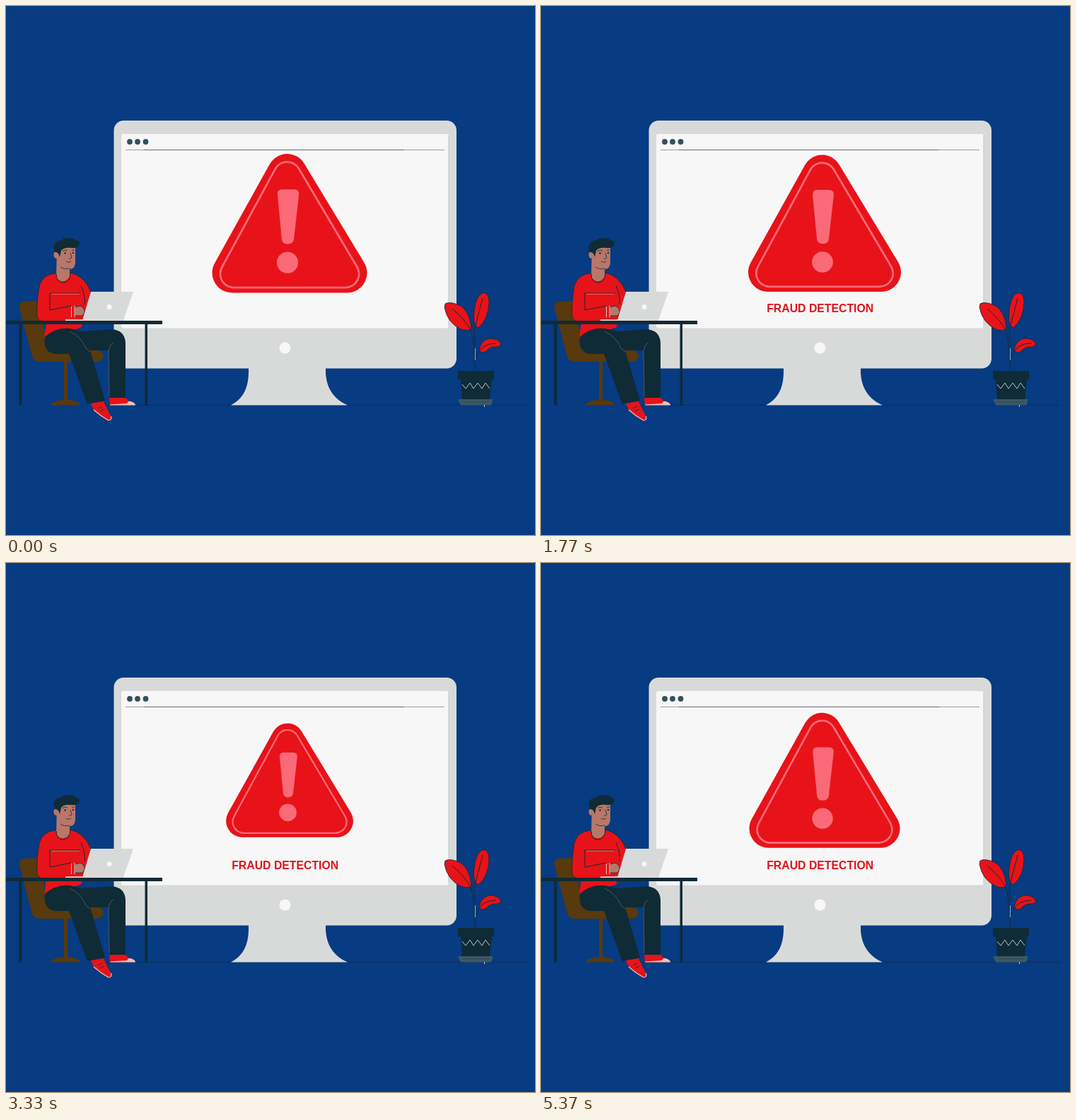
Animation of 748x748 px, one loop 5.4 s. Source, as an HTML page:

```html
<!DOCTYPE html>
<html lang="en">
<head>
<meta charset="utf-8">
<title>Fraud detection</title>
<style>
  html, body { margin: 0; width: 100%; height: 100%; overflow: hidden; background: #073b82; }
  svg { display: block; width: 100%; height: 100%; }
  .red { fill: #e81319; }
  .dark { fill: #0f2b36; }
  .skin { fill: #b87769; }
  .grey { fill: #d8dada; }
  .white { fill: #f7f7f7; }
  .brown { fill: #583a0c; }
  .pale { fill: #e9c3bd; }
  .edge { stroke: #0f2b36; stroke-width: .8; }
  .line { fill: none; stroke: #0f2b36; stroke-width: 1; }
  .fine { stroke-width: .8; }
  .seam { fill: none; stroke: #53646b; stroke-width: .8; }
  text { font: bold 15.8px "Liberation Sans", Arial, sans-serif; text-anchor: middle; fill: #e0141b; }
</style>
</head>
<body>
<svg viewBox="0 0 748 748">
  <defs>
    <path id="tri" d="M397.5 237.5L482 377H320Z" stroke-linejoin="round"/>
    <path id="rim" d="M397.5 240L479.5 378.500H322.500Z" stroke-linejoin="round"/>
  </defs>

  <path class="line" d="M130 564.5H735" stroke-opacity=".7"/>

  <!-- monitor -->
  <rect class="grey" x="152.5" y="162" width="484.5" height="350.5" rx="14"/>
  <path class="grey" d="M343 512H452C451 540 464 556 483 564.5H318C334 556 344 542 343 512Z"/>
  <rect class="white" x="163" y="181" width="462.5" height="274.5" rx="3"/>
  <path d="M626 184V452" stroke="#c9cccc"/>
  <g fill="#34505d">
    <circle cx="175" cy="192" r="3.900"/><circle cx="186" cy="192" r="3.900"/><circle cx="197.500" cy="192" r="3.900"/>
  </g>
  <path d="M169 203.500H620" stroke="#9a9fa1"/>
  <path d="M195 203.500H563" stroke="#656c70"/>
  <circle class="white" cx="394.5" cy="483.5" r="8"/>

  <!-- warning sign -->
  <g id="sign">
    <use href="#tri" fill="#e81319" stroke="#e81319" stroke-width="56"/>
    <use href="#rim" fill="#fb6a78" stroke="#fb6a78" stroke-width="41"/>
    <use href="#rim" fill="#e81319" stroke="#e81319" stroke-width="35.500"/>
    <g fill="#fb6a78">
      <path d="M391 259.5H407Q415 259.5 414 267.5L407 330Q406 336.5 398 336.5Q391 336.5 390 330L384 267.5Q383 259.5 391 259.5Z"/>
      <circle cx="398" cy="362.5" r="15"/>
    </g>
  </g>
  <text id="label" x="394.7" y="433">FRAUD DETECTION</text>

  <!-- chair -->
  <g class="brown">
    <path d="M24 418Q18 420 19 427L36 492Q38 503 47 503H128Q138 502 138 493Q136 487 128 487H60L46 417Z"/>
    <path d="M82 502H87V557Q103 558 105 564.5H63Q66 558 82 557Z"/>
  </g>
  <path class="line" d="M42 424L51 446" stroke-opacity=".5"/>

  <!-- person -->
  <path class="red edge" d="M71 378Q52 379 47 396Q43 422 44 438Q45 446 54 446H112L120 404Q111 382 91 377Z"/>
  <path class="red" d="M57 448H107V454L56 472Q53 470 57 448Z"/>
  <path class="skin" d="M72 342Q84 334 98 341V362Q98 372 90 372V383Q81 395 71 384Z"/>
  <ellipse class="skin" cx="71" cy="352" rx="3.5" ry="5"/>
  <path class="line" d="M71 379Q71 391 81 391Q91 390 91 377"/>
  <path class="dark" d="M69 348Q65 338 71 334Q75 331 79 331Q83 326 90 329Q95 327 98 331Q106 332 103 339Q100 343 92 342Q82 341 78 346L76 355Q74 347 69 348Z"/>
  <circle class="dark" cx="83.5" cy="349.5" r="1.2"/><circle class="dark" cx="95" cy="349" r="1.2"/>
  <path class="line fine" d="M80 346.500Q83 344.500 87 346M93 345.500L97 345M91 349L93 356Q91 358 89 357M85 361Q89 364 92 361M77 369Q82 373 90 371"/>
  <path class="line" d="M62 430V406H105M62 430L92 424M106 395Q113 412 111 422"/>
  <path d="M64 407.200H104" stroke="#f08a80" stroke-width=".8"/>
  <path class="skin edge" d="M97 426L105 424Q112 427 111 434L108 438H97Z"/>
  <path d="M92.500 425V440M97 424V440" stroke="#f3c6c0"/>

  <path class="dark" d="M55 468Q70 454 90 456L110 460L150 457Q168 459 169 476V554H146L145 487L119 487L140 558L115 563L89 492H68Q52 488 55 468Z"/>
  <path class="seam" d="M90 460Q107 468 113 484L119 489M146 552L145 487L148 479L152 476"/>
  <path class="red" d="M120 562L138 559Q143 571 149 581Q150 586 145 586Q133 580 124 571Z"/>
  <path d="M124 571Q134 580 145 586Q150 586 148.500 580" fill="none" stroke="#e9c3bd" stroke-width="1.200"/>
  <path class="line fine" d="M130 569L136 566M133 573L139 570"/>
  <path class="red" d="M146 554H169Q174 560 180 561L183 564.500H147Z"/>
  <path class="pale" d="M171 562Q173 558 176 559Q183 561 183 564.500H147V563.500Z"/>

  <!-- laptop and desk -->
  <path class="grey" d="M120 404H180L166 444.500H108Z"/>
  <path d="M84 444.200H166" stroke="#e6d9d8" stroke-width="2"/>
  <circle class="white" cx="146" cy="425.500" r="3.500"/>
  <path class="dark" d="M0 445H221V450H0ZM18.500 450H22.500V564.500H18.500ZM196.500 450H200V564.500H196.500Z"/>

  <!-- plant -->
  <g class="red edge">
    <path d="M621 421Q628 417 643 424Q656 433 658 456Q655 461 643 457Q624 448 620 426Z"/>
    <path d="M675 405.500Q683 406 683 419Q682 443 668 455Q661 453 661.500 438Q663 409 675 405.500Z"/>
    <path d="M669 487Q671 473 683 470Q698 470 700 479Q696 483 688 482Q682 484 678 489Q672 491 669 487Z"/>
  </g>
  <path class="line" d="M631 428Q650 444 657 459Q663 475 663.500 514M674 413L662 459L664 480M693 477Q672 476 664 498"/>
  <path d="M663.500 484V501" stroke="#9db0ba"/>
  <path class="dark" d="M639 516H690V528H687L684 556H645L643 528H639Z"/>
  <path d="M645 535L650 541L656 533L661 541L667 533L673 541L678 533L684 541" fill="none" stroke="#b9c6cb"/>
  <path d="M639 556H689L686 564.500H643Z" fill="#3d5867"/>
  <path d="M645 560H684" stroke="#2c4553"/>
  <path d="M676.500 564V567" stroke="#c5d0d5"/>
</svg>
<script>
  const LOOP = 5400, STEP = 30, FULL = 218, CX = 401, CY = 307.3;
  // [time, sign width] at each turning point; straight lines between
  const turns = [[0, 219], [900, 85], [1800, 220.5], [2700, 85.5], [3582, 217.5], [4488, 81], [5400, 217.5]];
  const sign = document.getElementById('sign');
  const label = document.getElementById('label');

  function widthAt(t) {
    const i = turns.findIndex(turn => turn[0] > t);
    const [t0, w0] = turns[i - 1], [t1, w1] = turns[i];
    return w0 + (w1 - w0) * (t - t0) / (t1 - t0);
  }

  function draw(now) {
    const t = Math.floor(now % LOOP / STEP) * STEP;
    sign.setAttribute('transform',
      `translate(${CX} ${CY}) scale(${widthAt(t) / FULL}) translate(${-CX} ${-CY})`);
    label.setAttribute('opacity', Math.min(1, t / 900));
  }

  const start = performance.now();
  function tick() {
    draw(performance.now() - start);
    requestAnimationFrame(tick);
  }
  tick();
</script>
</body>
</html>
```
